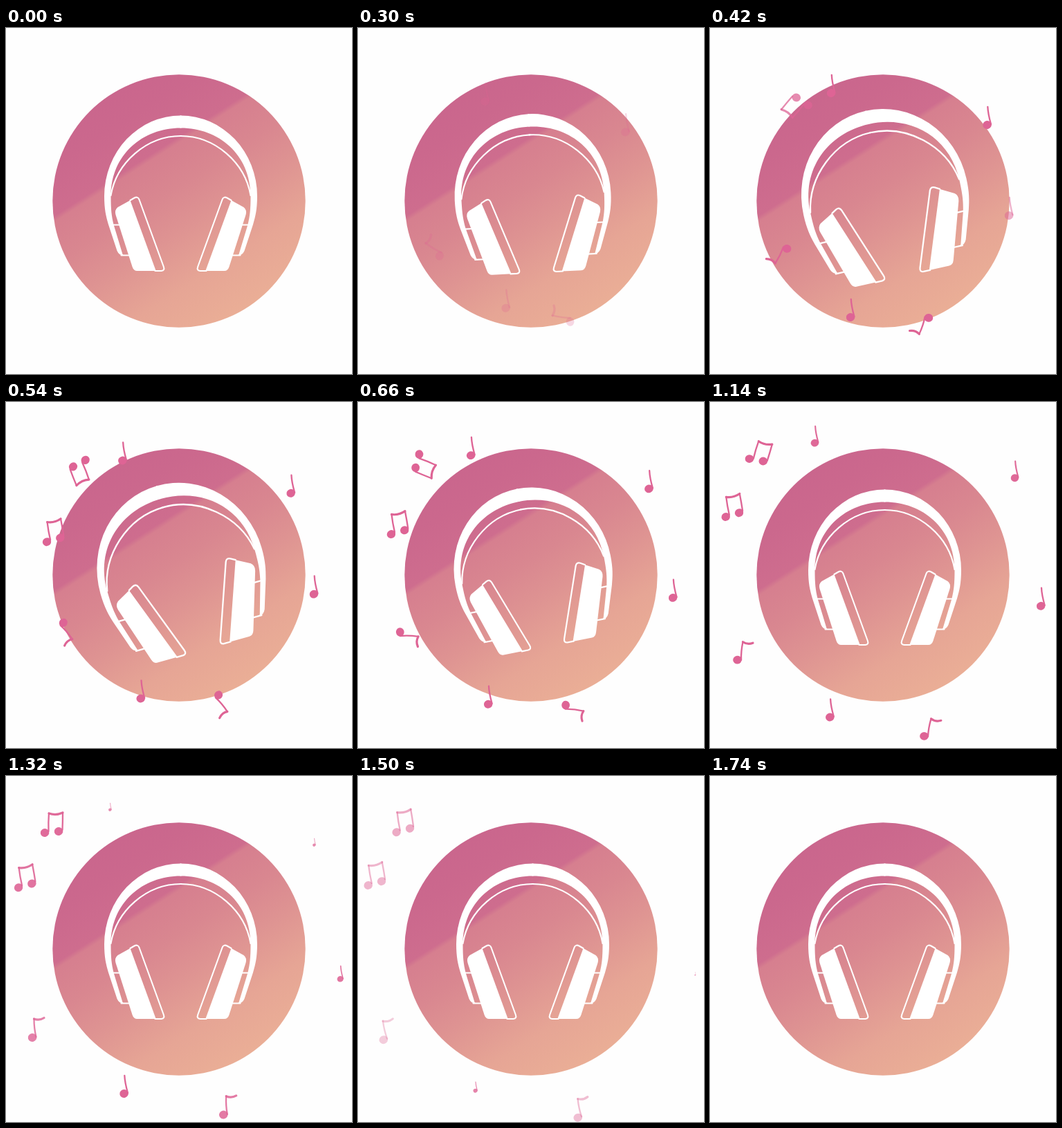
An HTML page with a canvas that plays this animation: 500x500 px, repeating every 2040 ms.

```html
<!DOCTYPE html>
<html lang="en">
<head>
<meta charset="utf-8">
<title>Headphones</title>
<style>
  html, body { margin: 0; width: 100%; height: 100%; overflow: hidden; background: #fefefe; }
  canvas { display: block; width: 100vmin; height: 100vmin; }
</style>
</head>
<body>
<canvas id="stage" width="500" height="500"></canvas>
<script>
const ctx = document.getElementById('stage').getContext('2d');
const LOOP = 2040, STEP = 30, START = 270, END = 1740;
const PINK = '#de6495';
const clamp = v => Math.max(0, Math.min(1, v));
const ramp = (t, from, length) => clamp((t - from) / length);
const swing = (t, length) => Math.sin(Math.PI * ramp(t, START, length));

// Exponential glide: 0 at 420 ms, 1 at 1320 ms.
const glide = (t, decay) =>
  (1 - Math.exp((420 - t) / decay)) / (1 - Math.exp(-900 / decay));

const discFill = ctx.createLinearGradient(152, 96, 348, 404);
[[0, '#ca668d'], [.12, '#cb688d'], [.285, '#ce6d8e'], [.305, '#d67f8f'], [.45, '#d98790'],
 [.6, '#de9392'], [.8, '#e6a595'], [1, '#eaae96']].forEach(([at, color]) => discFill.addColorStop(at, color));

// Left half of the headphones, relative to the centre of the band.
const half = {
  band: new Path2D('M0 -116.5A110.5 116.5 0 0 0 -110.5 0C-110.5 19 -108 29 -104.5 41' +
    'L-92 79Q-89 86 -82 86L-84 84L-97 41C-100 28 -101 20 -101 0' +
    'C-101 -60 -55 -98.5 0 -98.5H1V-116.5Z'),
  cup: new Path2D('M-91 16L-73 6L-35.8 108H-63Q-68 108 -70 102L-94 27Q-96 20 -91 16Z'),
  lines: new Path2D('M-101 -1C-93 -48 -50 -87 0.5 -87M-98 41.5H-87M-86 85.5H-73' +
    'M-73 6L-67 2.5Q-62 0 -60 5L-24.7 102Q-22.7 107.5 -28 108H-37')
};

const shapes = {
  plain: {
    heads: [[-2, 13]],
    stem: new Path2D('M-1.2 -13.2Q-0.8 -3 3.5 12')
  },
  flagged: {
    heads: [[-8.8, 14.2]],
    stem: new Path2D('M-3.3 13.2Q-6.3 1.2 -6.3 -12.8'),
    bar: new Path2D('M-6.3 -12.8Q1.2 -9.8 8.2 -14.3')
  },
  beamed: {
    heads: [[-13, 15], [7, 13]],
    stem: new Path2D('M-7.5 13Q-8 0 -7 -13M12.5 11Q13 0 13 -14'),
    bar: new Path2D('M-7 -13Q3 -9.5 13 -14')
  }
};

// angle: resting tilt, spin: extra turn that unwinds, shrink/fade: [start, length].
const notes = [
  { shape: 'plain', from: [177, 81], to: [151, 44], enter: 270, shrink: [1114, 322] },
  { shape: 'plain', from: [402.5, 127], to: [446, 95], enter: 270, shrink: [1114, 322] },
  { shape: 'plain', from: [434, 258], to: [484.5, 284], enter: 360, shrink: [1230, 320] },
  { shape: 'plain', from: [205, 405], to: [172.5, 446], enter: 270, shrink: [1330, 330] },
  { shape: 'flagged', from: [96, 326], to: [46.8, 363.8], enter: 270, spin: 213, decay: 350, fade: [1250, 370] },
  { shape: 'flagged', from: [302, 428], to: [323.8, 475.8], enter: 270, angle: 3, spin: 202, decay: 400, fade: [1260, 410] },
  { shape: 'beamed', from: [122, 115], to: [69, 67], enter: 330, spin: 219, decay: 420, fade: [1300, 440] },
  { shape: 'beamed', from: [83, 199], to: [28, 144], enter: 420, angle: -11, fade: [1275, 420] }
];

function place(x, y, degrees, scale) {
  ctx.translate(x, y);
  ctx.rotate(degrees * Math.PI / 180);
  ctx.scale(scale, scale);
}

function line(path, width) {
  ctx.lineWidth = width;
  ctx.stroke(path);
}

function drawNote(note, t) {
  const { shape, from, to, enter, angle = 0, spin = 0, decay = 400, shrink, fade } = note;
  const scale = shrink ? 1 - ramp(t, ...shrink) : 1;
  const gone = fade ? ramp(t, ...fade) : .4 * (1 - scale);
  const alpha = ramp(t, enter, 120) * (1 - gone);
  if (!alpha || !scale) return;

  const p = glide(t, 500);
  const [x, y] = from.map((start, i) => start + (to[i] - start) * p);
  const { heads, stem, bar } = shapes[shape];
  ctx.save();
  place(x, y, angle + spin * (1 - glide(t, decay)), scale);
  ctx.globalAlpha = alpha;
  ctx.fillStyle = ctx.strokeStyle = PINK;
  for (const [hx, hy] of heads) {
    ctx.beginPath();
    ctx.ellipse(hx, hy, 6.3, 5.9, -.3, 0, 2 * Math.PI);
    ctx.fill();
  }
  line(stem, 2.3);
  if (bar) line(bar, 3.2);
  ctx.restore();
}

function drawHeadphones(t) {
  ctx.save();
  place(255, 241, -16 * swing(t, 515), 1 + .103 * swing(t, 435));
  ctx.translate(-2.5, 2);
  ctx.fillStyle = ctx.strokeStyle = '#fff';
  for (const side of [1, -1]) {
    ctx.save();
    ctx.scale(side, 1);
    ctx.fill(half.band);
    ctx.fill(half.cup);
    line(half.lines, 2.1);
    ctx.restore();
  }
  ctx.restore();
}

function draw(now) {
  const t = Math.floor(now % LOOP / STEP) * STEP;
  ctx.fillStyle = '#fefefe';
  ctx.fillRect(0, 0, 500, 500);
  ctx.fillStyle = discFill;
  ctx.beginPath();
  ctx.arc(250, 250, 182.7, 0, 2 * Math.PI);
  ctx.fill();
  if (t >= START && t < END) notes.forEach(note => drawNote(note, t));
  drawHeadphones(t);
}

ctx.lineCap = ctx.lineJoin = 'round';
const began = performance.now();
function tick() {
  draw(performance.now() - began);
  requestAnimationFrame(tick);
}
tick();
</script>
</body>
</html>
```
